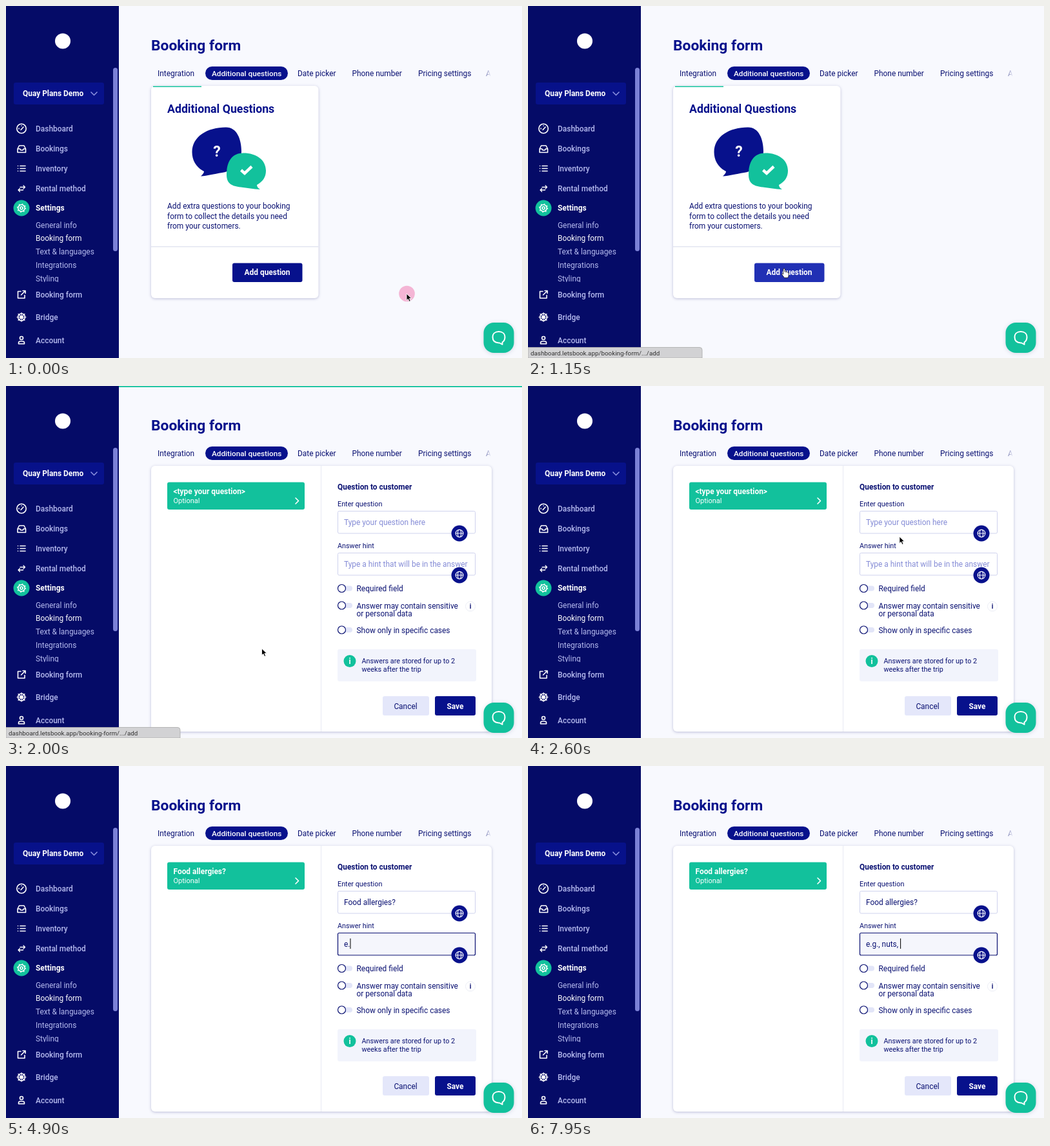
Animation, 800 px wide and 547 px high, one loop 8000 ms. Source, as an HTML page:

```html
<!DOCTYPE html>
<html lang="en">
<head>
<meta charset="utf-8">
<title>Booking form settings</title>
<style>
  html, body { margin: 0; width: 100%; height: 100%; overflow: hidden; background: #f8f9fe; }
  svg { display: block; width: 100vw; height: 100vh; }
  text { font: 400 11.92px Roboto, "Noto Sans", sans-serif; fill: #0a1172; white-space: pre; }
  .heading { font-weight: 600; font-size: 22.8px; fill: #07118c; }
  .title { font-weight: 600; font-size: 17.7px; fill: #07118c; }
  .bold { font-weight: 700; }
  .small { font-size: 10.8px; }
  .white, .nav .on { fill: #fff; }
  .nav text { fill: #b6bbef; }
  .nav .main { font-weight: 500; }
  .nav .main.on { font-weight: 700; }
  .hint { fill: #858cd6; }
  .line { fill: none; stroke: #fff; stroke-width: 1.6; stroke-linecap: round; stroke-linejoin: round; }
  .card { fill: #fff; filter: drop-shadow(0 1px 2px rgba(20, 25, 110, .26)); }
  .field { fill: #fff; stroke: #cfd2ee; }
  .field.focus { fill: #f5f6fc; stroke: #0a1172; stroke-width: 1.2; }
</style>
</head>
<body>
<svg viewBox="0 0 800 547" preserveAspectRatio="none">
  <defs>
    <clipPath id="submenu"><rect x="40" y="330" width="125" height="99"/></clipPath>
    <linearGradient id="fade"><stop offset="0" stop-color="#f8f9fe" stop-opacity="0.35"/><stop offset="1" stop-color="#f8f9fe"/></linearGradient>
    <g id="globe">
      <circle r="12.5" fill="#07118c"/>
      <g class="line" style="stroke-width:1.1">
        <circle r="5.8"/><ellipse rx="2.6" ry="5.8"/><path d="M-5.8 0H5.8"/>
      </g>
    </g>
    <g id="toggle">
      <rect x="0" y="-4" width="16.500" height="8" rx="4" fill="#e2e5f8"/>
      <circle r="6" fill="#fff" stroke="#0a1172" stroke-width="1.2"/>
    </g>
    <path id="beamShape" d="M-2.500-6.500Q0-6.500 0-4.500Q0-6.500 2.500-6.500M0-5V5M-2.500 6.500Q0 6.500 0 4.500Q0 6.500 2.500 6.500"/>
  </defs>

  <rect width="800" height="547" fill="#f8f9fe"/>
  <text class="heading" x="225" y="68.500">Booking form</text>
  <rect x="309" y="94" width="128" height="21" rx="10.500" fill="#07118c"/>
  <text x="235" y="109">Integration</text>
  <text class="white" x="319" y="109" style="font-weight:500;font-size:11.75px">Additional questions</text>
  <text x="452" y="109">Date picker</text>
  <text x="536.500" y="109">Phone number</text>
  <text x="639" y="109">Pricing settings</text>
  <text x="744" y="109">A</text>
  <rect x="742" y="96" width="10" height="18" fill="url(#fade)"/>

  <g id="intro">
    <rect class="card" x="225" y="124" width="259.500" height="330" rx="6"/>
    <rect x="228" y="124.500" width="75" height="1.500" fill="#12c19c"/>
    <text class="title" x="250" y="166">Additional Questions</text>
    <path fill="#07118c" d="M302 264.500C305 262 307 259 307 257C295 251 288.500 240 288.500 227C288.500 203 312 188.500 341 188.500C358 188.500 365 207 365 226C365 247 352 256 335 259C322 261 312 264 302 264.500Z"/>
    <path fill="#12c19c" d="M394 285C383 284.500 374 282.500 364 281.500C350 280 342 276 342 262C342 242 350 228.500 368 228.500C388 228.500 403 239 403 256C403 266 398 273 389 278C389 281 391 283 394 285Z"/>
    <text class="white bold" x="327" y="233.500" text-anchor="middle" style="font-size:23px">?</text>
    <path d="M364.500 255l5.500 5 11-10.500" fill="none" stroke="#fff" stroke-width="4.500"/>
    <text x="250" y="315">Add extra questions to your booking</text>
    <text x="250" y="330.500">form to collect the details you need</text>
    <text x="250" y="345.500">from your customers.</text>
    <path d="M225 374H484.500" stroke="#e2e4f0" stroke-width="1.400"/>
    <rect id="addButton" x="351" y="399.500" width="108.500" height="29.500" rx="3"/>
    <text class="white bold" x="405" y="418" text-anchor="middle">Add question</text>
  </g>

  <g id="editor">
    <rect class="card" x="225" y="124" width="528" height="413" rx="6"/>
    <path d="M488.500 124V537" stroke="#e8eaf4"/>
    <rect x="250" y="149.500" width="213" height="42.500" rx="3" fill="#12c19c"/>
    <text id="preview" class="white bold" x="259.500" y="168"></text>
    <text class="white" x="259.500" y="181.500" style="font-size:11px">Optional</text>
    <path class="line" d="M449 174l4.500 4.500-4.500 4.500"/>

    <text class="bold" x="514" y="161">Question to customer</text>
    <text class="small" x="514" y="187">Enter question</text>
    <rect id="questionBox" class="field" x="514.500" y="194.500" width="213" height="34.500" rx="2"/>
    <text id="question" x="524" y="216"></text>
    <text class="small" x="514" y="252">Answer hint</text>
    <rect id="answerBox" class="field" x="514.500" y="259.500" width="213" height="34.500" rx="2"/>
    <text id="answer" x="524" y="281"></text>
    <path id="caret" d="M0 0v16" stroke="#111" stroke-width="1.100"/>
    <use href="#globe" x="703" y="229"/>
    <use href="#globe" x="703" y="294"/>

    <use href="#toggle" x="520.500" y="314.500"/>
    <text x="543.500" y="319">Required field</text>
    <use href="#toggle" x="520.500" y="341"/>
    <text x="543.500" y="346">Answer may contain sensitive</text>
    <text x="543.500" y="357.500">or personal data</text>
    <circle cx="720" cy="342.500" r="7.500" fill="#fff" stroke="#eceef6"/>
    <text class="bold" x="720" y="346" text-anchor="middle" style="font-size:10px">i</text>
    <use href="#toggle" x="520.500" y="379"/>
    <text x="543.500" y="384">Show only in specific cases</text>

    <rect x="514" y="409" width="215" height="50" rx="3" fill="#f2f4fc"/>
    <circle cx="533" cy="427.500" r="9.500" fill="#12c19c"/>
    <text class="white bold" x="533" y="431.500" text-anchor="middle">i</text>
    <text class="small" x="551.500" y="431">Answers are stored for up to 2</text>
    <text class="small" x="551.500" y="444">weeks after the trip</text>
    <rect x="584" y="482" width="72" height="30" rx="3" fill="#e4e7fa"/>
    <text x="619.500" y="501.500" text-anchor="middle">Cancel</text>
    <rect x="665" y="482" width="63" height="30" rx="3" fill="#07118c"/>
    <text class="white bold" x="696.500" y="501.500" text-anchor="middle">Save</text>
  </g>

  <rect id="progress" x="175" width="0" height="1.800" fill="#12c19c"/>

  <g class="nav">
    <rect width="175" height="547" fill="#050b67"/>
    <circle cx="88" cy="54.500" r="12" fill="#fff"/>
    <rect x="12" y="119" width="140" height="34" rx="3" fill="#07118a"/>
    <text class="bold on" x="26" y="140">Quay Plans Demo</text>
    <path d="M131.500 133.500l5 5 5-5" fill="none" stroke="#8d93e0" stroke-width="1.500"/>
    <rect x="166" y="96" width="7" height="285" rx="3.500" fill="#7b81d6"/>
    <circle cx="24" cy="314" r="12.500" fill="#12c19c"/>
    <g id="menu"></g>
    <g id="sub" clip-path="url(#submenu)"></g>
    <g class="line">
      <circle cx="24" cy="190.500" r="7.200"/>
      <path d="M23 192.500l4-4.500M20 191v-1M24 186v.2"/>
      <path d="M18 222l2.500-5h7.500l2.500 5v5.500h-12.500zM18 222h3.500l1.500 2h3l1.500-2h3"/>
      <path d="M22 248.500h8M22 252.500h8M22 256.500h8M18.500 248.500h.1M18.500 252.500h.1M18.500 256.500h.1"/>
      <path d="M22 281.500h7.500l-2.500-2.500M26.500 286h-7.500l2.500 2.500M19 286l2.500-2.500M29.500 281.500l-2.500 2.500" stroke-width="1.300"/>
      <circle cx="24" cy="314" r="2"/>
      <circle cx="24" cy="314" r="5.200"/>
      <circle cx="24" cy="314" r="6.300" stroke-dasharray="1.500 3.450" stroke-linecap="butt"/>
      <path d="M23 443.500h-4.500v10.500h10.500v-4.500M26 442.500h4v4M30 442.500l-6.500 6.500"/>
      <circle cx="24" cy="483.500" r="5.500"/>
      <circle cx="24" cy="483.500" r="1.800"/>
      <path d="M24 476.500v14M17 483.500h14M19 478.500l10 10M29 478.500l-10 10" stroke-width="1.100"/>
      <circle cx="24" cy="516" r="2.500"/>
      <path d="M19.500 525v-1.500q0-2.500 3-2.500h3q3 0 3 2.500v1.500z"/>
    </g>
  </g>

  <g id="status">
    <path d="M0 530.500h266q4 0 4 4v12.500H0z" fill="#d2d2d4" stroke="#aaa" stroke-width=".8"/>
    <text x="4" y="542.500" style="font-size:9.8px;fill:#333">dashboard.letsbook.app/booking-form/.../add</text>
  </g>

  <rect x="740.500" y="492" width="47" height="47" rx="16" fill="#12c19c" style="filter:drop-shadow(0 1px 3px rgba(20,30,90,.16))"/>
  <path class="line" style="stroke-width:2" d="M764 506C770 506 773.500 509.500 773.500 514.500C773.500 518.500 772 521 769.500 522.500V526L765 523.500C758 523.500 754.500 520 754.500 514.500C754.500 509.500 758 506 764 506Z"/>

  <circle id="ripple" fill="#ee4f98"/>
  <g id="pointer">
    <path id="arrow" d="M0 0V10.500L2.400 8.300 4.200 12.300 6.200 11.400 4.400 7.600H7.800Z" fill="#000" stroke="#fff" stroke-width=".9"/>
    <path id="hand" d="M-1 0.500q0-1.500 1.200-1.500T1.400 .5V4.200q4-.3 6 1.600v3.200q0 2.500-1.500 4.500H.5L-3.500 8q.3-2 2.500-.2z" fill="#fff" stroke="#111" stroke-width=".8"/>
    <g id="beam" fill="none">
      <use href="#beamShape" stroke="#fff" stroke-width="2.400"/>
      <use href="#beamShape" stroke="#111" stroke-width="1.100"/>
    </g>
  </g>
</svg>

<script>
const $ = id => document.getElementById(id);
const LOOP = 8000;
const OPEN_EDITOR = 1750, FOCUS_QUESTION = 2750, FOCUS_ANSWER = 3800;
const QUESTION = "Food allergies?", ANSWER = "e.g., nuts, ";
const questionKeys = [...QUESTION].map((_, i) => 2900 + i * 42);
const answerKeys = [4650, 4900, 5050, 5350, 6050, 6450, 6600, 6900, 7200, 7500, 7650, 7850];
const clicks = [-250, 1350, FOCUS_QUESTION, FOCUS_ANSWER];
// time, x, y
const path = [
  [0, 621, 447], [100, 621, 447], [800, 397, 409], [1950, 396.5, 408], [2150, 396.5, 408],
  [2720, 577, 212], [3500, 577, 212], [3750, 577, 278], [LOOP, 577, 278]
];

const addItems = (group, cls, items, active) => {
  for (const [label, y] of items) {
    const item = document.createElementNS("http://www.w3.org/2000/svg", "text");
    item.setAttribute("x", 46);
    item.setAttribute("y", y);
    item.setAttribute("class", cls + (label === active ? " on" : ""));
    item.textContent = label;
    group.append(item);
  }
};
addItems($("menu"), "main", [["Dashboard", 195], ["Bookings", 226], ["Inventory", 257],
  ["Rental method", 288], ["Settings", 318], ["Booking form", 453], ["Bridge", 488], ["Account", 524]], "Settings");
addItems($("sub"), "", [["General info", 345], ["Booking form", 365], ["Text & languages", 386],
  ["Integrations", 407], ["Styling", 428]], "Booking form");

const clamp = v => Math.max(0, Math.min(1, v));
const progress = (t, from, to) => clamp((t - from) / (to - from));
const ease = v => v * v * (3 - 2 * v);
const show = (id, on) => { $(id).style.display = on ? "" : "none"; };
const typed = (text, keys, t) => text.slice(0, keys.filter(k => k <= t).length);

function pointerAt(t) {
  const i = path.findIndex(p => p[0] > t);
  const [t0, x0, y0] = path[i - 1], [t1, x1, y1] = path[i];
  const k = ease(progress(t, t0, t1));
  // the sideways part of a move settles before the vertical part
  const kx = clamp(k * 1.12);
  return [x0 + (x1 - x0) * kx, y0 + (y1 - y0) * k];
}

function setInput(id, value, hint) {
  $(id).textContent = value || hint;
  $(id).classList.toggle("hint", !value);
}

function drawCaret(t, inAnswer, value) {
  const keys = inAnswer ? answerKeys : questionKeys;
  const last = Math.max(inAnswer ? FOCUS_ANSWER : FOCUS_QUESTION, ...keys.filter(k => k <= t));
  show("caret", t >= FOCUS_QUESTION && (t - last) % 1000 < 500);
  const width = value ? $(inAnswer ? "answer" : "question").getComputedTextLength() : 0;
  $("caret").setAttribute("transform", `translate(${524.5 + width} ${inAnswer ? 268 : 203})`);
}

function drawPointer(t, x, y, hover) {
  const hidden = (t >= questionKeys[0] && t < 3500) || t >= answerKeys[0];
  const inField = t >= OPEN_EDITOR && x > 514 && x < 728 && (y > 194 && y < 229 || y > 259 && y < 294);
  show("pointer", !hidden);
  show("hand", hover);
  show("beam", inField);
  show("arrow", !hover && !inField);
  $("pointer").setAttribute("transform", `translate(${x} ${y})`);

  const click = clicks.findLast(c => c <= t);
  const fade = progress(t - click, 150, 450);
  $("ripple").setAttribute("cx", x + .5);
  $("ripple").setAttribute("cy", y);
  $("ripple").setAttribute("r", 14 - 5 * fade);
  $("ripple").setAttribute("opacity", .6 * (1 - fade));
}

function render(t) {
  const editing = t >= OPEN_EDITOR, inAnswer = t >= FOCUS_ANSWER;
  const [x, y] = pointerAt(t);
  const hover = !editing && x > 351 && x < 459 && y > 399 && y < 429;
  const question = typed(QUESTION, questionKeys, t), answer = typed(ANSWER, answerKeys, t);

  show("intro", !editing);
  show("editor", editing);
  $("addButton").setAttribute("fill", hover ? "#2130b4" : "#07118c");
  show("status", t >= 700 && t < 2350);
  $("progress").setAttribute("width", 625 * ease(progress(t, 1450, 1900)));
  $("progress").setAttribute("opacity", 1 - progress(t, 2050, 2300));

  $("preview").textContent = question || "<type your question>";
  setInput("question", question, "Type your question here");
  setInput("answer", answer, "Type a hint that will be in the answer");
  $("questionBox").classList.toggle("focus", t >= FOCUS_QUESTION && !inAnswer);
  $("answerBox").classList.toggle("focus", inAnswer);
  drawCaret(t, inAnswer, inAnswer ? answer : question);
  drawPointer(t, x, y, hover);
}

const start = performance.now();
function tick() {
  render((performance.now() - start) % LOOP);
  requestAnimationFrame(tick);
}
tick();
</script>
</body>
</html>
```
